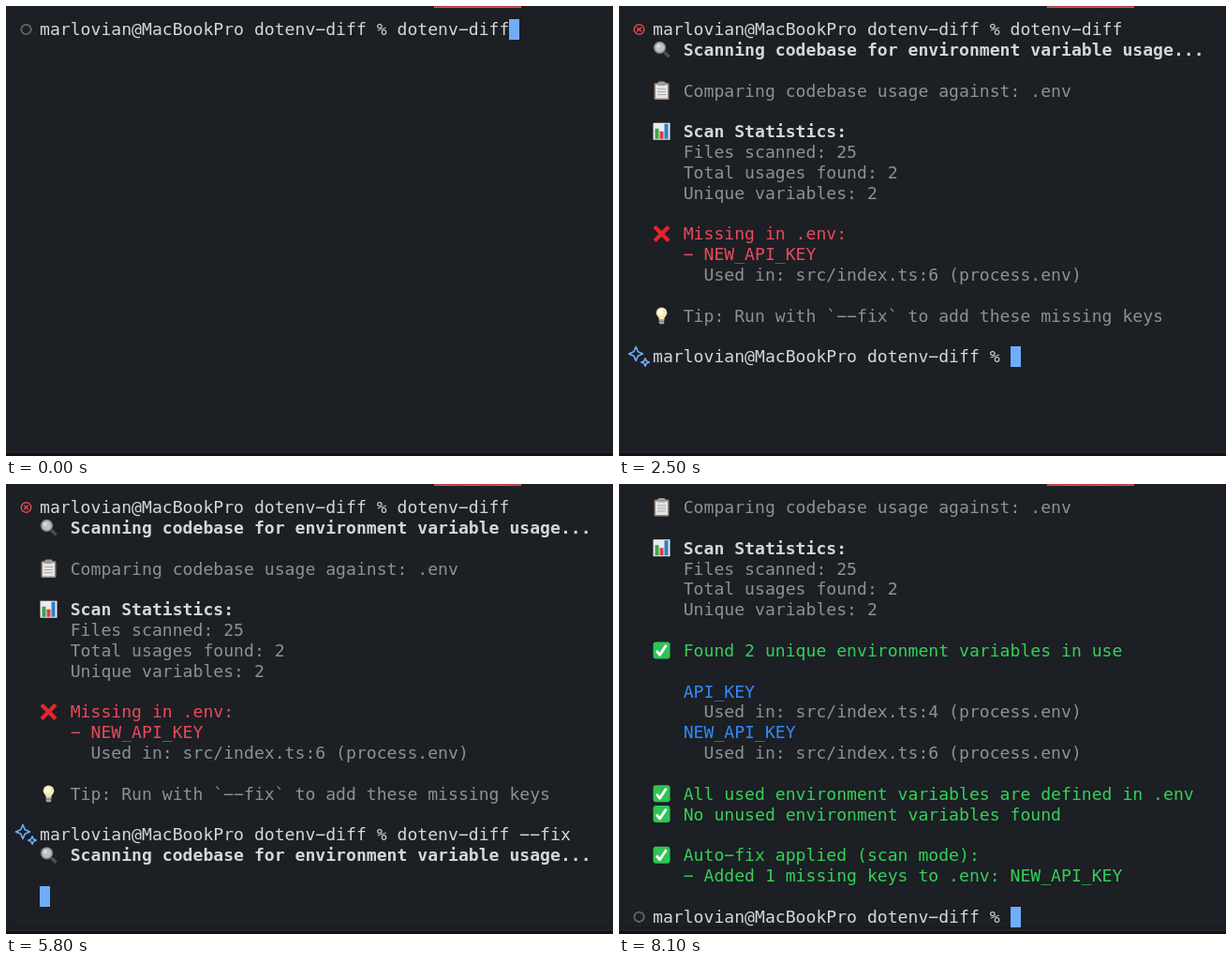
Recreate the animation shown at these times as an HTML page with a canvas. Size 648x480 px, loop 8.2 s.

```html
<!DOCTYPE html>
<html lang="en">
<head>
<meta charset="utf-8">
<title>dotenv-diff terminal</title>
<style>
  html, body { margin: 0; width: 100%; height: 100%; overflow: hidden; background: #1c1f24; }
  canvas { display: block; width: 648px; height: 480px; }
</style>
</head>
<body>
<canvas id="stage" width="648" height="480"></canvas>
<script>
const ctx = document.getElementById('stage').getContext('2d');
const LOOP = 8200, LEFT = 36, TOP = 14, CELL = 10.9, LINE = 21.84;
const FONT = '18.1px "DejaVu Sans Mono", "Liberation Mono", monospace';
const C = {
  bg: '#1c1f24', text: '#d3d7dc', dim: '#8d9094', red: '#ea4a5a',
  green: '#34d058', blue: '#2f8cff', cursor: '#6fadfb', ring: '#64676b'
};
const PROMPT = 'marlovian@MacBookPro dotenv-diff % ';
const CMD = 'dotenv-diff';

const rowTop = row => TOP + row * LINE;

function box(x, y, w, h, color) {
  ctx.fillStyle = color;
  ctx.fillRect(x, y, w, h);
}

function roundBox(x, y, w, h, r, color) {
  ctx.fillStyle = color;
  ctx.beginPath();
  ctx.roundRect(x, y, w, h, r);
  ctx.fill();
}

function disc(x, y, r, color) {
  ctx.fillStyle = color;
  ctx.beginPath();
  ctx.arc(x, y, r, 0, Math.PI * 2);
  ctx.fill();
}

function ring(x, y, r, width, color) {
  ctx.strokeStyle = color;
  ctx.lineWidth = width;
  ctx.beginPath();
  ctx.arc(x, y, r, 0, Math.PI * 2);
  ctx.stroke();
}

function line(color, width, ...pts) {
  ctx.strokeStyle = color;
  ctx.lineWidth = width;
  ctx.beginPath();
  pts.forEach(([x, y]) => ctx.lineTo(x, y));
  ctx.stroke();
}

// Each character sits on the terminal grid; hyphens use the wide dash shape.
function text(row, col, str, color, bold) {
  ctx.font = (bold ? 'bold ' : '') + FONT;
  ctx.fillStyle = color;
  const y = rowTop(row) + 17;
  [...str].forEach((ch, i) => {
    if (ch !== ' ') ctx.fillText(ch === '-' ? '\u2212' : ch, LEFT + (col + i) * CELL, y);
  });
}

function cursor(row, col) {
  box(Math.round(LEFT + col * CELL), Math.round(rowTop(row)), 11, 22, C.cursor);
}

// Emoji are drawn around a centre point at (0, 0).
const emoji = {
  lens() {
    line('#4b4e52', 3.6, [3, 3], [8, 8]);
    disc(-2, -2, 6.6, '#85898d');
    disc(-2, -2, 5, '#b9c4c9');
    disc(-3.5, -3.5, 2, '#d6dfe2');
  },
  clipboard() {
    roundBox(-8, -8, 16, 18, 1.5, '#93816f');
    box(-6.5, -6, 13, 14.5, '#e3e4e4');
    roundBox(-4, -9.5, 8, 4.5, 1.5, '#9a9da0');
    for (let y = -2; y < 7; y += 3) box(-4.5, y, 9, 1, '#a9abad');
  },
  chart() {
    box(-9, -9, 18, 18, '#e9eced');
    box(-7, -3, 4, 11, '#36a447');
    box(-2, 0, 4, 8, '#d9423f');
    box(3, -8, 4, 16, '#2f7fc4');
  },
  cross() {
    line('#e5252f', 4.2, [-7.5, -7.5], [7.5, 7.5]);
    line('#e5252f', 4.2, [7.5, -7.5], [-7.5, 7.5]);
  },
  bulb() {
    disc(0, -3, 5.8, '#f4e9b5');
    box(-3, 0, 6, 4.5, '#f4e9b5');
    disc(-1, -3.5, 3, '#fffbe4');
    roundBox(-2.8, 4, 5.6, 5, 1.5, '#a3a6a8');
    box(-2.8, 6, 5.6, 0.8, '#707376');
  },
  check() {
    roundBox(-9, -9, 18, 18, 3, '#2fc455');
    line('#ffffff', 2.8, [-5.5, 0.5], [-2, 5], [5, -5.5]);
  }
};

function icon(row, name) {
  ctx.save();
  ctx.translate(45.5, rowTop(row) + 10.5);
  emoji[name]();
  ctx.restore();
}

function star(x, y, r) {
  ctx.beginPath();
  for (let i = 0; i < 8; i++) {
    const a = i * Math.PI / 4, d = i % 2 ? r * 0.42 : r;
    ctx.lineTo(x + d * Math.sin(a), y - d * Math.cos(a));
  }
  ctx.closePath();
  ctx.stroke();
}

function mark(row, kind) {
  const x = 21.5, y = rowTop(row) + 11;
  if (kind === 'idle') ring(x, y, 5.2, 1.8, C.ring);
  if (kind === 'error') {
    ring(x, y, 5.3, 1.5, '#e5484d');
    line('#e5484d', 1.5, [x - 2.3, y - 2.3], [x + 2.3, y + 2.3]);
    line('#e5484d', 1.5, [x + 2.3, y - 2.3], [x - 2.3, y + 2.3]);
  }
  if (kind === 'sparkle') {
    ctx.strokeStyle = C.cursor;
    ctx.lineWidth = 1.6;
    ctx.lineJoin = 'round';
    star(x - 3.5, y - 3.5, 7.5);
    star(x + 6.5, y + 5.5, 4.2);
  }
}

function prompt(row, cmd, kind) {
  mark(row, kind);
  text(row, 0, PROMPT + cmd, C.text);
}

function scanning(row) {
  icon(row, 'lens');
  text(row, 3, 'Scanning codebase for environment variable usage...', C.text, true);
}

function stats(row) {
  icon(row, 'clipboard');
  text(row, 3, 'Comparing codebase usage against: .env', C.dim);
  icon(row + 2, 'chart');
  text(row + 2, 3, 'Scan Statistics:', C.text, true);
  ['Files scanned: 25', 'Total usages found: 2', 'Unique variables: 2']
    .forEach((s, i) => text(row + 3 + i, 3, s, C.dim));
}

function usedIn(row, n) {
  text(row, 5, `Used in: src/index.ts:${n} (process.env)`, C.dim);
}

function success(row, str) {
  icon(row, 'check');
  text(row, 3, str, C.green);
}

function firstReport() {
  scanning(1);
  stats(3);
  icon(10, 'cross');
  text(10, 3, 'Missing in .env:', C.red);
  text(11, 3, '- NEW_API_KEY', C.red);
  usedIn(12, 6);
  icon(14, 'bulb');
  text(14, 3, 'Tip: Run with `--fix` to add these missing keys', C.dim);
}

function fixedReport() {
  stats(0);
  success(7, 'Found 2 unique environment variables in use');
  text(9, 3, 'API_KEY', C.blue);
  usedIn(10, 4);
  text(11, 3, 'NEW_API_KEY', C.blue);
  usedIn(12, 6);
  success(14, 'All used environment variables are defined in .env');
  success(15, 'No unused environment variables found');
  success(17, 'Auto-fix applied (scan mode):');
  text(18, 3, '- Added 1 missing keys to .env: NEW_API_KEY', C.green);
  prompt(20, '', 'idle');
  cursor(20, PROMPT.length);
}

// The command is recalled at once, then its flag is typed key by key.
const RECALL = 3100;
const KEYS = [3600, 3800, 4000, 4200, 4400, 4600];
function typed(t) {
  if (t < RECALL) return '';
  return CMD + ' --fix'.slice(0, KEYS.filter(k => t >= k).length);
}

function frame() {
  box(0, 0, 648, 480, C.bg);
  box(3, 0, 1, 473, '#181b1f');
  box(647, 0, 1, 473, '#181b1f');
  box(0, 473, 648, 1, '#15171b');
  box(0, 474, 648, 3, '#202328');
  box(0, 477, 648, 3, '#121117');
  box(457, 0, 93, 2, '#b5383c');
  for (let x = 457; x < 550; x += 2) box(x, 1, 1, 1, '#ee7773');
}

function draw(t) {
  frame();
  if (t >= 6000) return fixedReport();

  const done = t >= 2000;
  prompt(0, CMD, done ? 'error' : 'idle');
  if (t < 800) return cursor(0, PROMPT.length + CMD.length);
  if (t < 1800) return cursor(1, 0);
  if (!done) {
    scanning(1);
    return cursor(3, 0);
  }

  firstReport();
  const cmd = typed(t);
  prompt(16, cmd, 'sparkle');
  if (t < 5400) return cursor(16, PROMPT.length + cmd.length);
  if (t < 5700) return cursor(17, 0);
  scanning(17);
  cursor(19, 0);
}

const start = performance.now();
function tick() {
  draw((performance.now() - start) % LOOP);
  requestAnimationFrame(tick);
}
tick();
</script>
</body>
</html>
```
